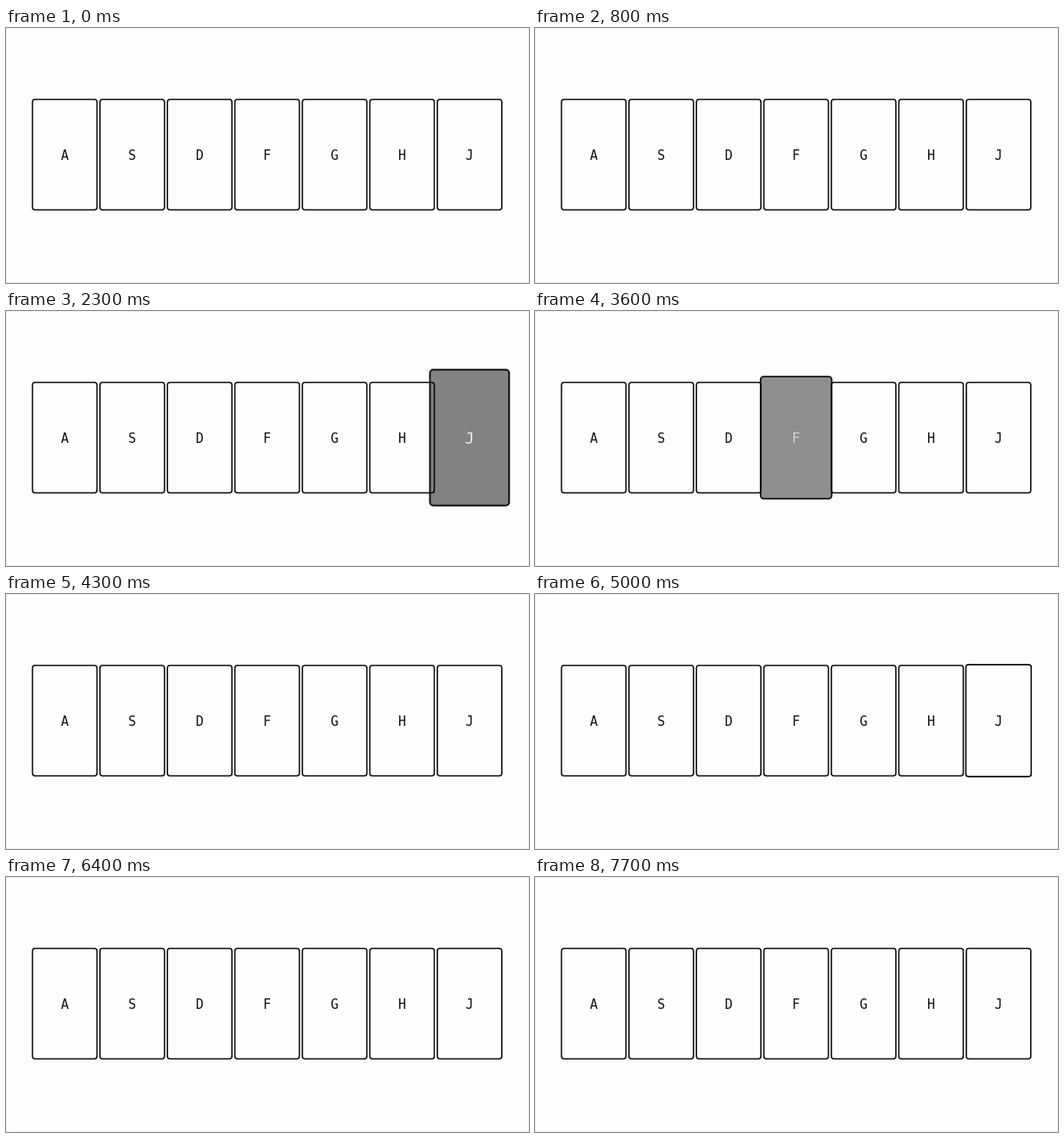
An HTML page with a canvas for the animation above (8000 ms loop, 600x292 px).

```html
<!DOCTYPE html>
<html lang="en">
<head>
<meta charset="utf-8">
<title>Keys</title>
<style>
  html, body { margin: 0; width: 100%; height: 100%; overflow: hidden; background: #fdfffc; }
  canvas { display: block; }
</style>
</head>
<body>
<canvas id="stage" width="600" height="292"></canvas>
<script>
const ctx = document.getElementById('stage').getContext('2d');
const LOOP = 8000, KEYS = 'ASDFGHJ';
const RISE = 100, TINT = 35; // ms for the scale and the colour to change

// Three runs from A to J: the time each key is struck
const RUNS = [
  [150, 530, 875, 1205, 1555, 1905, 2255],
  [2515, 2830, 3145, 3579, 3998, 4411, 4827],
  [5170, 5545, 5850, 6190, 6615, 7040, 7450]
];

const mix = (a, b, k) => a + (b - a) * k;
const bezier = (a, b, u) => 3 * a * u * (1 - u) ** 2 + 3 * b * u * u * (1 - u) + u ** 3;

// The CSS "ease" curve
function ease(p) {
  if (p <= 0) return 0;
  if (p >= 1) return 1;
  let lo = 0, hi = 1;
  for (let i = 0; i < 20; i++) {
    const mid = (lo + hi) / 2;
    if (bezier(.25, .25, mid) < p) lo = mid; else hi = mid;
  }
  return bezier(.1, 1, lo);
}

// Up for RISE ms, then back down
const pulse = (age, length) => ease(age / length) - ease((age - RISE) / length);

function drawKey(i, age) {
  const tint = pulse(age, TINT), scale = 1 + .3 * pulse(age, RISE);
  const ink = Math.round(mix(17, 230, tint));
  ctx.save();
  ctx.translate(67.4 + i * 77.4, 145);
  ctx.scale(scale, scale);
  ctx.beginPath();
  ctx.roundRect(-37, -63.3, 74, 126.6, 3);
  ctx.fillStyle = `rgba(0,0,0,${.49 * tint})`;
  ctx.fill();
  ctx.strokeStyle = '#111';
  ctx.lineWidth = 1.6;
  ctx.stroke();
  ctx.fillStyle = `rgb(${ink},${ink},${ink})`;
  ctx.fillText(KEYS[i], 0, 5.5);
  ctx.restore();
}

function draw(now) {
  const t = now % LOOP;
  ctx.fillStyle = '#fdfffc';
  ctx.fillRect(0, 0, 600, 292);
  ctx.strokeStyle = '#f5eeee';
  ctx.lineWidth = 1;
  ctx.strokeRect(.5, .5, 599, 291);
  ctx.font = '15px "DejaVu Sans Mono", monospace';
  ctx.textAlign = 'center';

  const ages = [...KEYS].map((_, i) => {
    const start = RUNS.map(run => run[i]).filter(s => s <= t).pop();
    return start === undefined ? LOOP : t - start;
  });
  const pressed = i => ages[i] < 2 * RISE;
  // Struck keys lie above their neighbours
  for (const top of [false, true])
    ages.forEach((age, i) => { if (pressed(i) === top) drawKey(i, age); });
}

const begin = performance.now();
function tick() {
  draw(performance.now() - begin);
  requestAnimationFrame(tick);
}
tick();
</script>
</body>
</html>
```
